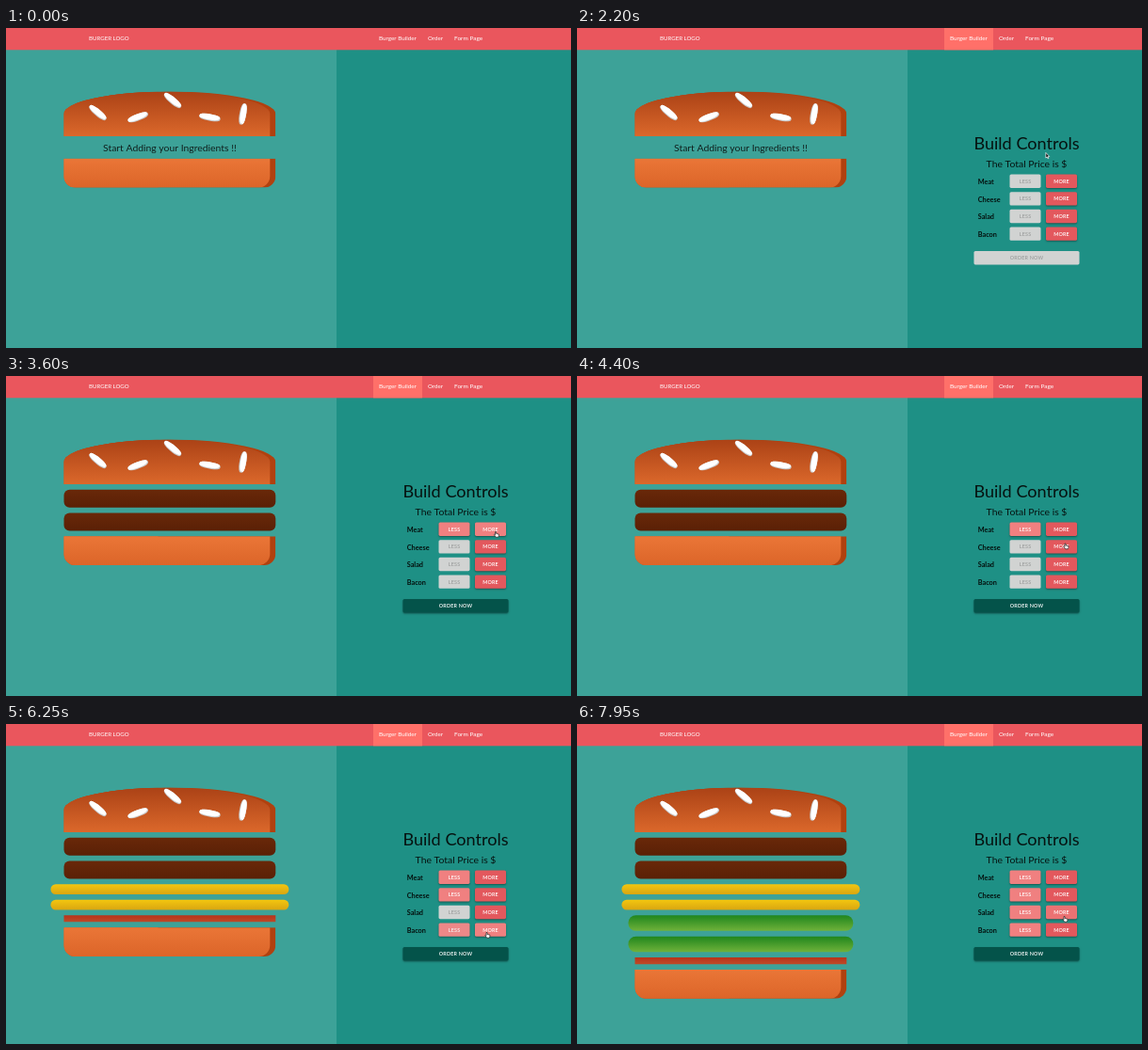
Write an HTML page with a canvas that moves like this. It is 600 px wide and 340 px high and loops after 8000 ms.

```html
<!DOCTYPE html>
<html lang="en">
<head>
<meta charset="utf-8">
<title>Burger builder</title>
<style>
html, body { margin: 0; width: 100%; height: 100%; overflow: hidden; background: #1e9085; }
canvas { display: block; width: 600px; height: 340px; }
</style>
</head>
<body>
<canvas id="stage"></canvas>
<script>
const LOOP = 8000;
const FONT = 'Lato, "Open Sans", sans-serif';
const canvas = document.getElementById('stage');
const ctx = canvas.getContext('2d');
const dpr = window.devicePixelRatio || 1;
canvas.width = 600 * dpr;
canvas.height = 340 * dpr;

// Burger box: ingredient sizes are shares of its width and height
const BOX = { cx: 173.9, w: 281, h: 237, gap: 5.8 };
const BUN = { x: 61.5, w: 224.8, top: 67.5, topH: 47.5, bottomH: 30.8, edge: 6 };
const SEEDS = [[97.5, 90, 40], [140.2, 94.8, -20], [177, 77, 40], [216.5, 95, 10], [251.5, 91.5, 100]];

// added: click times; glow: when the MORE button is lit
const ROWS = [
  { name: 'Meat', w: .8, h: .08, r: 6, fill: ['#692809', '#5a2006'], added: [2900, 3600], glow: [3150, 3950] },
  { name: 'Cheese', w: .9, h: .045, r: 5.3, fill: ['#f3c60f', '#d9a611'], added: [4600, 4900], glow: [4500, 5400] },
  { name: 'Salad', w: .85, h: .07, r: 8, fill: ['#1f861d', '#6fb13a'], added: [6950, 7350], glow: [6850, 7850] },
  { name: 'Bacon', w: .8, h: .03, r: 0, fill: ['#b8331a', '#bd4a27'], added: [6050], glow: [5950, 6450] }
];
const STACK = [0, 1, 2, 3];

// time, x, y of the pointer
const PATH = [
  [0, 612, 120], [300, 606, 110], [1050, 421, 16], [1750, 421, 16], [2400, 520, 166],
  [3850, 520, 166], [4250, 518.5, 178.5], [5150, 518.5, 180], [5450, 515, 204],
  [5550, 515, 204], [5850, 510.5, 222], [6450, 510.5, 222], [6800, 517.5, 205], [LOOP, 517.5, 205]
];

const clamp = v => Math.max(0, Math.min(1, v));
const ease = v => { v = clamp(v); return v * v * (3 - 2 * v); };
const ramp = (t, start, span = 250) => ease((t - start) / span);

function mix(a, b, k) {
  const part = (c, i) => parseInt(c.slice(1 + 2 * i, 3 + 2 * i), 16);
  return 'rgb(' + [0, 1, 2].map(i => Math.round(part(a, i) + (part(b, i) - part(a, i)) * k)) + ')';
}

function rect(x, y, w, h, fill) {
  ctx.fillStyle = fill;
  ctx.fillRect(x, y, w, h);
}

function round(x, y, w, h, r, fill) {
  ctx.beginPath();
  ctx.roundRect(x, y, w, h, r);
  ctx.fillStyle = fill;
  ctx.fill();
}

function text(str, x, y, size, color, { align = 'left', weight = 400, spacing = 0 } = {}) {
  ctx.font = `${weight} ${size}px ${FONT}`;
  ctx.letterSpacing = spacing + 'px';
  ctx.textAlign = align;
  ctx.textBaseline = 'alphabetic';
  ctx.fillStyle = color;
  ctx.fillText(str, x, y);
}

function shade(y, h, [from, to]) {
  const g = ctx.createLinearGradient(0, y, 0, y + h);
  g.addColorStop(0, from);
  g.addColorStop(1, to);
  return g;
}

// Bread with a darker inner edge on the right
function bread(y, h, radii, colors) {
  ctx.save();
  ctx.beginPath();
  ctx.roundRect(BUN.x, y, BUN.w, h, radii);
  ctx.clip();
  const fill = shade(y, h, colors);
  rect(BUN.x, y, BUN.w, h, '#b0410f');
  rect(BUN.x, y, 100, h, fill);
  round(BUN.x - BUN.edge, y, BUN.w, h, radii, fill);
  ctx.restore();
}

function seed([x, y, angle]) {
  const w = 22.5, h = 7.1;
  const oval = fill => round(-w / 2, -h / 2, w, h, { x: w * .4, y: h * .4 }, fill);
  ctx.save();
  ctx.translate(x, y);
  ctx.rotate(angle * Math.PI / 180);
  oval('#c9c9c9');
  ctx.clip();
  ctx.translate(-.8, -1);
  oval('#ffffff');
  ctx.restore();
}

function burger(t) {
  const half = { x: BUN.w / 2, y: BUN.topH / 2 };
  bread(BUN.top, BUN.topH, [half, half, 0, 0], ['#ab4216', '#db682b']);
  SEEDS.forEach(seed);
  let y = BUN.top + BUN.topH + BOX.gap;
  const start = y;
  for (const i of STACK) {
    const row = ROWS[i], w = row.w * BOX.w, h = row.h * BOX.h;
    for (const at of row.added) {
      if (t < at) continue;
      round(BOX.cx - w / 2, y, w, h, row.r, shade(y, h, row.fill));
      y += h + BOX.gap;
    }
  }
  if (y === start) {
    text('Start Adding your Ingredients !!', BOX.cx, 130.8, 10.4, '#10201e', { align: 'center' });
    y = 138.7;
  }
  bread(y, BUN.bottomH, [0, 0, 12, 12], ['#ea7637', '#dc6529']);
}

function button(label, x, y, w, fill, color, lift) {
  ctx.save();
  ctx.shadowColor = `rgba(0,0,0,${.4 * lift})`;
  ctx.shadowBlur = 2 * dpr;
  ctx.shadowOffsetY = 1 * dpr;
  round(x, y, w, 14.4, 1.6, fill);
  ctx.restore();
  text(label, x + w / 2, y + 9.2, 5.4, color, { align: 'center', weight: 600, spacing: .2 });
}

function controls(t) {
  text('Build Controls', 477.5, 129, 18.1, '#061210', { align: 'center' });
  text('The Total Price is $', 477.5, 147.8, 10.4, '#061210', { align: 'center' });
  ROWS.forEach((row, i) => {
    const y = 155.5 + i * 18.65;
    const on = ramp(t, row.added[0]);
    const lit = ramp(t, row.glow[0]) - ramp(t, row.glow[1]);
    text(row.name, 425.7, y + 10.5, 7.3, '#04100e', { weight: 700 });
    button('LESS', 459.5, y, 33, mix('#d1d3d2', '#f08080', on), mix('#9c9e9d', '#ffffff', on), on);
    button('MORE', 498, y, 33, mix('#e3585d', '#f08080', lit), '#ffffff', 1);
  });
  const ready = ramp(t, ROWS[0].added[0]);
  button('ORDER NOW', 421.5, 237, 112, mix('#d1d3d2', '#04534a', ready), mix('#9c9e9d', '#ffffff', ready), ready);
}

function navbar(t) {
  rect(0, 0, 600, 23.3, '#ea565d');
  ctx.globalAlpha = ramp(t, 1150, 350);
  rect(390, 0, 52, 23.3, '#ff7069');
  ctx.globalAlpha = 1;
  text('BURGER LOGO', 88, 12.8, 6.1, '#ffffff');
  text('Burger Builder', 396, 12.8, 6.3, '#ffffff');
  text('Order', 448, 12.8, 6.2, '#ffffff');
  text('Form Page', 476, 12.8, 6.5, '#ffffff');
}

function statusBar() {
  round(-4, 334, 40, 10, 1.5, '#d9dddc');
  text('devserver:8000', -2.6, 339.4, 5.2, '#3b4040');
}

function outline(points) {
  ctx.beginPath();
  points.forEach(([x, y]) => ctx.lineTo(x, y));
  ctx.closePath();
}

function pointer(t) {
  let i = 1;
  while (i < PATH.length - 1 && PATH[i][0] < t) i++;
  const [t0, x0, y0] = PATH[i - 1], [t1, x1, y1] = PATH[i];
  const k = ease((t - t0) / (t1 - t0));
  const x = x0 + (x1 - x0) * k, y = y0 + (y1 - y0) * k;
  const link = (y < 23 && x > 390 && x < 442) || (x > 498 && x < 531 && y > 155 && y < 226);
  ctx.save();
  ctx.translate(x, y);
  ctx.lineJoin = 'round';
  ctx.lineWidth = .7;
  if (link) {
    outline([[-.5, -.5], [.5, -.5], [.7, 1.5], [3.4, 2.1], [3.4, 3.9], [2.7, 5.2], [.2, 5.2], [-1.7, 2.6], [-1.2, 2.1], [-.4, 2.8]]);
    ctx.fillStyle = '#ffffff';
    ctx.strokeStyle = '#222222';
  } else {
    outline([[0, 0], [0, 5.6], [1.3, 4.5], [2.2, 6.4], [3, 6], [2.2, 4.2], [3.9, 4.1]]);
    ctx.fillStyle = '#111111';
    ctx.strokeStyle = '#ffffff';
  }
  ctx.fill();
  ctx.stroke();
  ctx.restore();
}

function draw(t) {
  ctx.setTransform(dpr, 0, 0, dpr, 0, 0);
  rect(0, 0, 600, 340, '#1e9085');
  rect(0, 0, 351, 340, '#3da298');
  navbar(t);
  burger(t);
  if (t >= 1250) controls(t);
  if (t >= 1150 && t < 2150) statusBar();
  pointer(t);
}

function tick() {
  draw(performance.now() % LOOP);
  requestAnimationFrame(tick);
}
tick();
</script>
</body>
</html>
```
